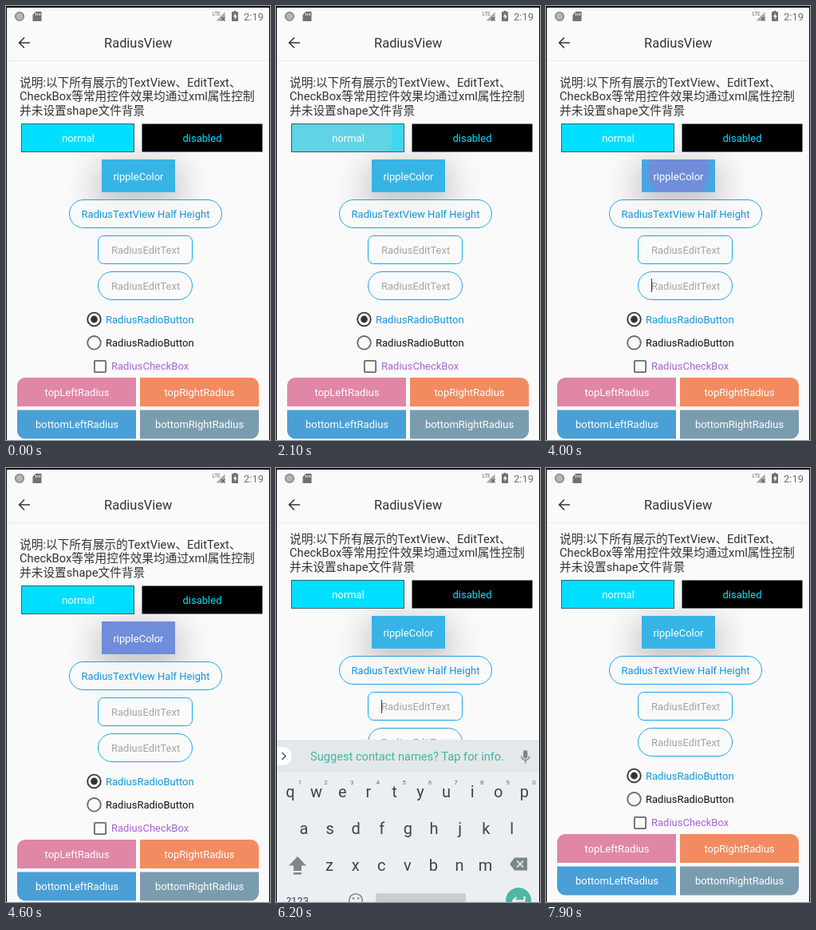
Recreate the animation shown at these times as an HTML page. Size 331 by 543 pixels, loop 8000 ms.

```html
<!DOCTYPE html>
<html lang="zh">
<head>
<meta charset="utf-8">
<title>RadiusView</title>
<style>
  html, body { margin: 0; width: 100%; height: 100%; overflow: hidden; background: #fafafa; }
  svg { display: block; width: 331px; height: 543px; }
  text { font: 13px Roboto, "Noto Sans CJK SC", "Noto Sans CJK", sans-serif; }
  .mid { text-anchor: middle; }
  .white { fill: #fff; }
  .blue { fill: #1296db; }
  .hint { fill: #a4a4a4; }
  .desc { font-size: 14.7px; fill: #333; }
  .title { font-size: 16.4px; fill: #333; }
  .outline { fill: none; stroke: #1ba4e8; }

  /* 100 ms = 1.25% of the loop */
  .anim, .ripple, .ripple circle { animation: 8s step-end infinite; }
  .ripple circle { transform-box: fill-box; transform-origin: center; }
  .ripple rect { opacity: .31; }
  .ripple circle { opacity: .25; }
  .grey { fill: #c8c8c8; }
  .purple { fill: #aa66cc; }
  .ripple.purple rect { opacity: .17; }
  .ripple.purple circle { opacity: .4; }

  #r1 { animation-name: fade1; }
  #r1 circle { animation-name: grow1; }
  #r2 { animation-name: fade2; }
  #r2 circle { animation-name: grow2; }
  #r3 { animation-name: fade3; }
  #r3 circle { animation-name: grow3; }
  #page { animation-name: scroll; }
  #caret1 { animation-name: caret1; }
  #caret2 { animation-name: caret2; }
  #keys { animation-name: keys; }

  @keyframes fade1 {
    0% { opacity: 0; }
    13.75% { opacity: .5; animation-timing-function: steps(2); }
    16.25% { opacity: 1; }
    26.25% { opacity: 1; animation-timing-function: steps(4); }
    31.25%, 100% { opacity: 0; }
  }
  @keyframes grow1 {
    0% { transform: scale(.1); }
    13.75% { transform: scale(.1); animation-timing-function: steps(10); }
    26.25% { transform: scale(.87); animation-timing-function: steps(4); }
    31.25%, 100% { transform: scale(1); }
  }
  @keyframes fade2 {
    0% { opacity: 0; }
    42.5% { opacity: 1; }
    57.5% { opacity: 1; animation-timing-function: steps(4); }
    62.5%, 100% { opacity: 0; }
  }
  @keyframes grow2 {
    0%, 42.5% { transform: scale(.275); }
    43.75% { transform: scale(.34); }
    45% { transform: scale(.34); animation-timing-function: steps(9); }
    56.25%, 100% { transform: scale(1); }
  }
  @keyframes fade3 {
    0% { opacity: 0; }
    62.5% { opacity: .5; animation-timing-function: steps(2); }
    65% { opacity: 1; }
    71.25% { opacity: 1; animation-timing-function: steps(2); }
    73.75%, 100% { opacity: 0; }
  }
  @keyframes grow3 {
    0% { transform: scale(.1); }
    62.5% { transform: scale(.1); animation-timing-function: steps(7); }
    71.25% { transform: scale(.87); animation-timing-function: steps(2); }
    73.75%, 100% { transform: scale(1); }
  }
  @keyframes scroll {
    0% { transform: none; }
    75% { transform: translateY(0); animation-timing-function: steps(2); }
    77.5%, 100% { transform: translateY(-7px); }
  }
  @keyframes caret1 {
    0% { opacity: 0; }
    75% { opacity: 1; }
    81.25% { opacity: 0; }
    87.5% { opacity: 1; }
    93.75%, 100% { opacity: 0; }
  }
  @keyframes caret2 {
    0% { opacity: 0; }
    5% { opacity: 1; }
    11.25% { opacity: 0; }
    48.75% { opacity: 1; }
    55% { opacity: 0; }
    61.25% { opacity: 1; }
    67.5%, 100% { opacity: 0; }
  }
  @keyframes keys {
    0% { transform: translateY(240px); }
    75% { transform: translateY(170px); }
    76.25% { transform: translateY(80px); }
    77.5% { transform: translateY(24px); }
    78.75% { transform: none; }
    96.25% { transform: translateY(35px); }
    97.5% { transform: translateY(130px); }
    98.75%, 100% { transform: translateY(240px); }
  }

  #keys text { fill: #37474f; }
  #letters text { font-size: 20px; text-anchor: middle; }
  #letters .digit { font-size: 8px; fill: #607078; }
  #keys .suggest { font-size: 14.65px; fill: #3fb5a3; }
</style>
</head>
<body>
<svg viewBox="0 0 331 543">
  <defs>
    <filter id="blur" x="-100%" y="-150%" width="300%" height="400%"><feGaussianBlur stdDeviation="20"/></filter>
    <clipPath id="c1"><rect x="19" y="147" width="142" height="36"/></clipPath>
    <clipPath id="c2"><rect x="120" y="192" width="92" height="41"/></clipPath>
    <clipPath id="c3"><rect x="79" y="242" width="192" height="36" rx="18"/></clipPath>
  </defs>
  <rect width="331" height="543" fill="#fafafa"/>

  <g id="page" class="anim">
    <text class="desc" x="17" y="101">说明:以下所有展示的TextView、EditText、</text>
    <text class="desc" x="17" y="118.3">CheckBox等常用控件效果均通过xml属性控制</text>
    <text class="desc" x="17" y="135.6">并未设置shape文件背景</text>

    <rect x="112" y="196" width="108" height="62" filter="url(#blur)" opacity=".2"/>

    <rect x="19" y="147" width="142" height="36" fill="#00dfff"/>
    <g clip-path="url(#c1)"><g id="r1" class="ripple grey">
      <rect x="19" y="147" width="142" height="36"/>
      <circle cx="78" cy="165" r="78"/>
    </g></g>
    <rect x="19.5" y="147.5" width="141" height="35" fill="none" stroke="#2c6272"/>
    <text class="mid white" x="90.5" y="169.6">normal</text>
    <rect x="170.5" y="147.5" width="151" height="35"/>
    <text class="mid" x="246" y="169.6" fill="#00dfff">disabled</text>

    <rect x="120" y="192" width="92" height="41" fill="#36b4e6"/>
    <g clip-path="url(#c2)"><g id="r2" class="ripple purple">
      <rect x="120" y="192" width="92" height="41"/>
      <circle cx="166" cy="207" r="60"/>
    </g></g>
    <text class="mid white" x="166" y="217.5">rippleColor</text>

    <rect x="79" y="242" width="192" height="36" rx="18" fill="#fafafa" opacity=".85"/>
    <g clip-path="url(#c3)"><g id="r3" class="ripple grey">
      <rect x="79" y="242" width="192" height="36"/>
      <circle cx="168" cy="260" r="100"/>
    </g></g>
    <rect class="outline" x="79.5" y="242.5" width="191" height="35" rx="17.5"/>
    <text class="mid blue" x="175" y="265">RadiusTextView Half Height</text>

    <rect class="outline" x="115.5" y="287.5" width="118" height="35" rx="7"/>
    <text class="hint" x="132" y="310">RadiusEditText</text>
    <rect id="caret1" class="anim" x="132" y="297" width="1" height="17" fill="#333"/>
    <rect class="outline" x="115.5" y="332.5" width="118" height="35" rx="17.5"/>
    <text class="hint" x="132" y="355">RadiusEditText</text>
    <rect id="caret2" class="anim" x="132" y="341" width="1" height="17" fill="#333"/>

    <g fill="none" stroke-width="1.8">
      <circle cx="110.5" cy="392" r="8.3" stroke="#333"/>
      <circle cx="110.5" cy="421.3" r="8.3" stroke="#6a6a6a"/>
      <rect x="110.9" y="443.9" width="14.2" height="14.2" rx="1" stroke="#6a6a6a"/>
    </g>
    <circle cx="110.5" cy="392" r="4.4" fill="#333"/>
    <text class="blue" x="125" y="396.6">RadiusRadioButton</text>
    <text x="125" y="426" fill="#111">RadiusRadioButton</text>
    <text x="132" y="455.4" fill="#a864d0">RadiusCheckBox</text>

    <path d="M14 501V475a10 10 0 0 1 10-10H163V501z" fill="#e086a6"/>
    <path d="M168 465H307a10 10 0 0 1 10 10V501H168z" fill="#f28b60"/>
    <path d="M14 505.500H163V541.500H24a10 10 0 0 1-10-10z" fill="#4a9fd6"/>
    <path d="M168 505.500H317V531.500a10 10 0 0 1-10 10H168z" fill="#7a9caf"/>
    <g class="mid white">
      <text x="89" y="488.4">topLeftRadius</text>
      <text x="242.5" y="488.4">topRightRadius</text>
      <text x="89" y="528">bottomLeftRadius</text>
      <text x="242.5" y="528">bottomRightRadius</text>
    </g>
  </g>

  <rect y="0" width="331" height="68" fill="#fafafa"/>
  <rect y="68" width="331" height="1" fill="#ececec"/>
  <g fill="#707070">
    <circle cx="17" cy="13" r="5.3" fill="#b5b5b5" stroke="#868686" stroke-width="1.6"/>
    <path d="M37.5 7H44.5V19H33.5V11z"/>
    <path d="M37.5 9v3M40 9v3M42.5 9v3" stroke="#fafafa"/>
    <text x="258.5" y="11.5" style="font-size:6.5px">LTE</text>
    <path d="M274.5 7.5V18.5H263.5z" fill="#a8a8a8"/>
    <path d="M270 14l4.5 4.5m0-4.5l-4.5 4.5" stroke="#666" stroke-width="1.2"/>
    <path d="M285.5 6h3v1.3h2.5V19h-8V7.3h2.5z"/>
    <path d="M287.8 9l-3 4.6h2v3.4l3-4.8h-2z" fill="#fafafa"/>
    <text x="298" y="17.7">2:19</text>
  </g>
  <path d="M30 46H17M23 39.5L16.5 46l6.5 6.5" fill="none" stroke="#333" stroke-width="1.5"/>
  <text class="title mid" x="165.7" y="52">RadiusView</text>

  <g id="keys" class="anim">
    <rect y="316" width="331" height="227" fill="#eceff1"/>
    <rect y="316" width="331" height="40" fill="#e3e8ea"/>
    <path d="M0 325H8a11.5 11.5 0 0 1 0 23H0z" fill="#fff"/>
    <path d="M7.5 332l4.5 4.5-4.5 4.5" fill="none" stroke="#555f64" stroke-width="1.7"/>
    <text class="suggest" x="43" y="342">Suggest contact names? Tap for info.</text>
    <rect x="310" y="329" width="5.4" height="10.5" rx="2.7" fill="#7c878c"/>
    <path d="M307.7 336.5a5 5 0 0 0 10 0M312.7 341.5V345.5" fill="none" stroke="#7c878c" stroke-width="1.5"/>
    <g id="letters"></g>
    <path d="M27 462l11 11.5h-6V480H22v-6.5h-6z" fill="#7c878c"/>
    <rect x="22" y="482" width="10" height="2.6" fill="#7c878c"/>
    <path d="M293 471.5l6-8h16v16h-16z" fill="#7c878c"/>
    <path d="M302 467.5l8 8m0-8l-8 8" stroke="#eceff1" stroke-width="1.7"/>
    <text class="mid" x="27" y="522">?123</text>
    <circle cx="100" cy="517" r="8.3" fill="none" stroke="#7c878c" stroke-width="1.6"/>
    <g fill="#7c878c">
      <path d="M95.5 519a4.8 4.8 0 0 0 9 0z"/>
      <circle cx="97" cy="514.5" r="1.3"/>
      <circle cx="103" cy="514.5" r="1.3"/>
    </g>
    <rect x="125" y="508" width="113" height="18.5" rx="2" fill="#c9ced1"/>
    <circle cx="304" cy="517" r="16" fill="#4db6a6"/>
    <path d="M311.5 512v5.5H297.5M301.5 513l-4.5 4.5 4.5 4.5" fill="none" stroke="#fff" stroke-width="1.8"/>
  </g>

  <path d="M0 0H331V543H330V2H1V543H0z" fill="#000"/>
</svg>
<script>
  const letters = document.getElementById("letters");

  function key(label, x, y, cls = "") {
    const el = document.createElementNS("http://www.w3.org/2000/svg", "text");
    el.textContent = label;
    el.setAttribute("x", x);
    el.setAttribute("y", y);
    el.setAttribute("class", cls);
    letters.append(el);
  }

  function row(chars, x, y) {
    [...chars].forEach((c, i) => key(c, x + i * 32.6, y));
  }

  row("qwertyuiop", 18, 388);
  row("asdfghjkl", 35, 434);
  row("zxcvbnm", 67, 479.5);
  [..."1234567890"].forEach((d, i) => key(d, 30 + i * 32.6, 372, "digit"));
  key(",", 67.5, 522);
  key(".", 263, 522);
</script>
</body>
</html>
```
